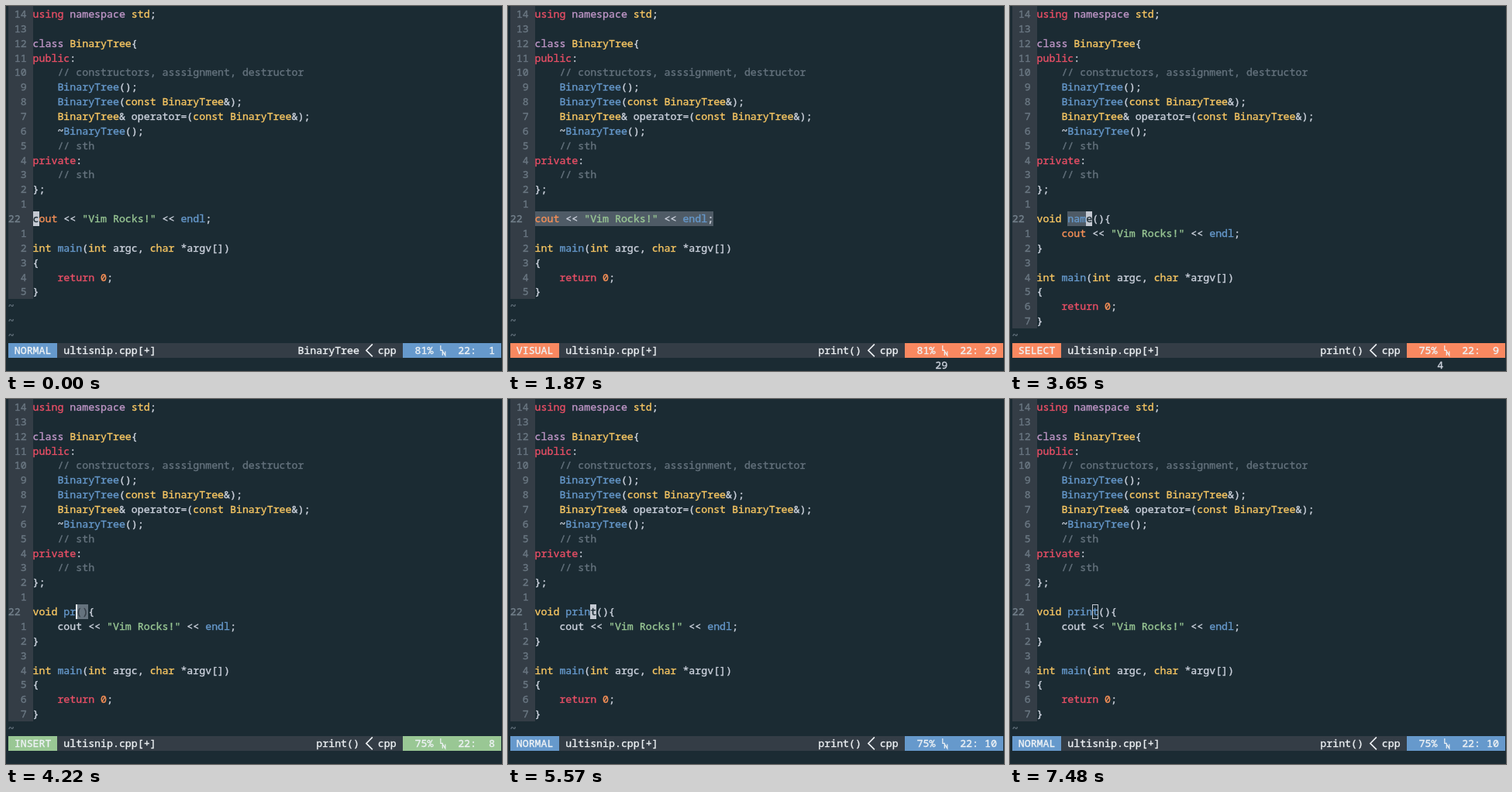
Recreate the animation shown at these times as an HTML page with a canvas. Size 640 by 471 pixels, loop 7530 ms.

```html
<!DOCTYPE html>
<html lang="en">
<head>
<meta charset="utf-8">
<title>Editor snippet demo</title>
<style>
  html, body { margin: 0; width: 100%; height: 100%; overflow: hidden; background: #1b2b33; }
  canvas { display: block; width: 640px; height: 471px; }
</style>
</head>
<body>
<canvas id="stage"></canvas>
<script>
const W = 640, H = 471, LOOP = 7530;
const LEFT = 2.8, CW = 7.95, RH = 18.87, TOP = 0.9;
const GUTTER = 4, CUR_ROW = 14, STATUS_ROW = 23;
const FONT = '500 13.25px "Noto Sans Mono", "DejaVu Sans Mono", monospace';

const INK = {
  w: '#cdd3de', r: '#ea4f66', p: '#c097c8', y: '#fac863', b: '#6699cc',
  o: '#f99157', g: '#99c794', c: '#65737e', d: '#1b2b33', l: '#eef2f5'
};
const BG = '#1b2b33', BAR = '#343d46', SELECTED = '#4f5b66', MATCH = '#65737e', BLOCK = '#c4c9d2';
const MODE_BG = { NORMAL: '#6699cc', VISUAL: '#f98860', SELECT: '#f98860', INSERT: '#99c794' };

// "^x" switches the ink to colour x
const HEAD = [
  '^rusing ^pnamespace ^ystd^w;',
  '',
  '^pclass ^yBinaryTree^w{',
  '^rpublic^w:',
  '    ^c// constructors, asssignment, destructor',
  '    ^bBinaryTree^w();',
  '    ^bBinaryTree^w(^yconst BinaryTree^w&);',
  '    ^yBinaryTree^w& operator=(^yconst BinaryTree^w&);',
  '    ^w~^bBinaryTree^w();',
  '    ^c// sth',
  '^rprivate^w:',
  '    ^c// sth',
  '^w};',
  ''
];
const TAIL = [
  '',
  '^yint ^bmain^w(^yint ^wargc, ^ychar ^w*argv[])',
  '^w{',
  '    ^rreturn ^o0^w;',
  '^w}'
];
const PRINT = '^w << ^g"Vim Rocks!"^w << ^bendl^w;';

// Key presses: time, mode, column, typed word
const KEYS = [
  [0, 'NORMAL', 1],
  [350, 'VISUAL', 1],
  [600, 'VISUAL', 30],
  [1100, 'VISUAL', 29],
  [2100, 'INSERT', 1, ''],
  [2480, 'INSERT', 2, 'f'],
  [2640, 'INSERT', 3, 'fu'],
  [2800, 'INSERT', 4, 'fun'],
  [3300, 'SELECT', 9, 'name'],
  [4020, 'INSERT', 7, 'p'],
  [4140, 'INSERT', 8, 'pr'],
  [4260, 'INSERT', 9, 'pri'],
  [4380, 'INSERT', 10, 'prin'],
  [4500, 'INSERT', 11, 'print'],
  [5100, 'NORMAL', 10, 'print']
];
const EXPAND = 3300, BLUR = 7100;

const canvas = document.getElementById('stage');
const ctx = canvas.getContext('2d');
const dpr = window.devicePixelRatio || 1;
canvas.width = W * dpr;
canvas.height = H * dpr;
ctx.scale(dpr, dpr);

const colX = col => LEFT + col * CW;
const rowY = row => TOP + row * RH;
const plain = line => line.replace(/\^\w/g, '');

function cells(row, col, count, color) {
  const x = Math.round(colX(col)), y = Math.round(rowY(row));
  ctx.fillStyle = color;
  ctx.fillRect(x, y, Math.round(colX(col + count)) - x, Math.round(rowY(row + 1)) - y);
}

// A hairline outline gives the strokes a medium weight
function text(str, row, col, color) {
  const x = colX(col), y = rowY(row) + 14;
  ctx.font = FONT;
  ctx.fillStyle = ctx.strokeStyle = color;
  ctx.lineWidth = 0.35;
  ctx.fillText(str, x, y);
  ctx.strokeText(str, x, y);
}

function codeLine(line, row) {
  let col = GUTTER, ink = 'w';
  line.split(/\^(\w)/).forEach((part, i) => {
    if (i % 2) { ink = part; return; }
    const body = part.trimStart();
    if (body) text(body, row, col + part.length - body.length, INK[ink]);
    col += part.length;
  });
}

function blinkOn(age) {
  return age < 700 || (age - 700) % 650 >= 400;
}

function stateAt(t) {
  const [at, mode, col, word] = KEYS.filter(k => k[0] <= t).pop();
  return { t, mode, col, word, expanded: t >= EXPAND, lit: blinkOn(t - at) };
}

function bodyOf(s) {
  if (s.expanded) {
    const cout = s.mode === 'SELECT' ? '^ocout' : '^wcout';
    return ['^yvoid ^b' + s.word + '^w(){', '    ' + cout + PRINT, '^w}'];
  }
  return [s.word === undefined ? '^ocout' + PRINT : '^w' + s.word];
}

function drawSelection(s) {
  if (s.mode === 'VISUAL') cells(CUR_ROW, GUTTER, Math.min(s.col, 29), SELECTED);
  if (s.mode === 'SELECT') cells(CUR_ROW, GUTTER + 5, 4, SELECTED);
}

function drawMatch(s) {
  if (s.mode !== 'INSERT' || !s.expanded) return;
  const col = GUTTER + s.col - 1;
  cells(CUR_ROW, col, 2, MATCH);
  text('()', CUR_ROW, col, BAR);
}

function drawCursor(s, line) {
  const col = GUTTER + s.col - 1, x = Math.round(colX(col)), y = Math.round(rowY(CUR_ROW));
  if (s.t >= BLUR) {
    ctx.strokeStyle = BLOCK;
    ctx.lineWidth = 1;
    ctx.strokeRect(x + 0.5, y + 0.5, 7, 18);
  } else if (s.lit && s.mode === 'INSERT') {
    ctx.fillStyle = '#e4e8ec';
    ctx.fillRect(x, y, 2, 19);
  } else if (s.lit) {
    cells(CUR_ROW, col, 1, BLOCK);
    text(plain(line)[s.col - 1] || '', CUR_ROW, col, INK.d);
  }
}

function lineIcon() {
  const x = colX(70) + 1.5, y = rowY(STATUS_ROW);
  ctx.strokeStyle = INK.l;
  ctx.lineWidth = 1.2;
  ctx.beginPath();
  ctx.moveTo(x, y + 3);
  ctx.lineTo(x, y + 9.5);
  ctx.lineTo(x + 3, y + 9.5);
  ctx.moveTo(x + 2.5, y + 16);
  ctx.lineTo(x + 2.5, y + 10.5);
  ctx.lineTo(x + 6, y + 16);
  ctx.lineTo(x + 6, y + 10.5);
  ctx.stroke();
}

function drawStatus(s) {
  const row = STATUS_ROW, tint = MODE_BG[s.mode];
  cells(row, 0, 80, BAR);
  cells(row, 0, 8, tint);
  cells(row, 64, 16, tint);
  text(s.mode, row, 1, INK.l);
  text('ultisnip.cpp[+]', row, 9, INK.l);

  const tag = s.t < 350 ? 'BinaryTree' : 'print()';
  text(tag, row, 57 - tag.length, INK.l);
  text('cpp', row, 60, INK.l);

  const x = colX(58), y = rowY(row);
  ctx.strokeStyle = INK.l;
  ctx.lineWidth = 1.6;
  ctx.beginPath();
  ctx.moveTo(x + 9, y + 1.5);
  ctx.lineTo(x + 1, y + 9.5);
  ctx.lineTo(x + 9, y + 17.5);
  ctx.stroke();

  text(s.expanded ? '75%' : '81%', row, 66, INK.l);
  lineIcon();
  text('22:' + String(s.col).padStart(3), row, 73, INK.l);

  const count = s.mode === 'VISUAL' ? String(s.col) : s.mode === 'SELECT' ? '4' : '';
  text(count, row + 1, 69, INK.w);
}

function draw(t) {
  const s = stateAt(t), body = bodyOf(s);
  const lines = [...HEAD, ...body, ...TAIL];
  ctx.fillStyle = BG;
  ctx.fillRect(0, 0, W, H);
  ctx.fillStyle = BAR;
  const edge = Math.round(LEFT);
  ctx.fillRect(edge, 0, Math.round(colX(GUTTER)) - edge, Math.round(rowY(lines.length)));

  drawSelection(s);
  lines.forEach((line, row) => {
    const num = row === CUR_ROW ? '22' : String(Math.abs(row - CUR_ROW)).padStart(3);
    text(num, row, 0, row === CUR_ROW ? '#75828d' : '#6b7883');
    codeLine(line, row);
  });
  for (let row = lines.length; row < STATUS_ROW; row++) text('~', row, 0, INK.c);

  drawMatch(s);
  drawCursor(s, body[0]);
  drawStatus(s);
}

let start;
function tick(now) {
  if (start === undefined) start = now;
  draw((now - start) % LOOP);
  requestAnimationFrame(tick);
}
draw(0);
requestAnimationFrame(tick);
</script>
</body>
</html>
```
